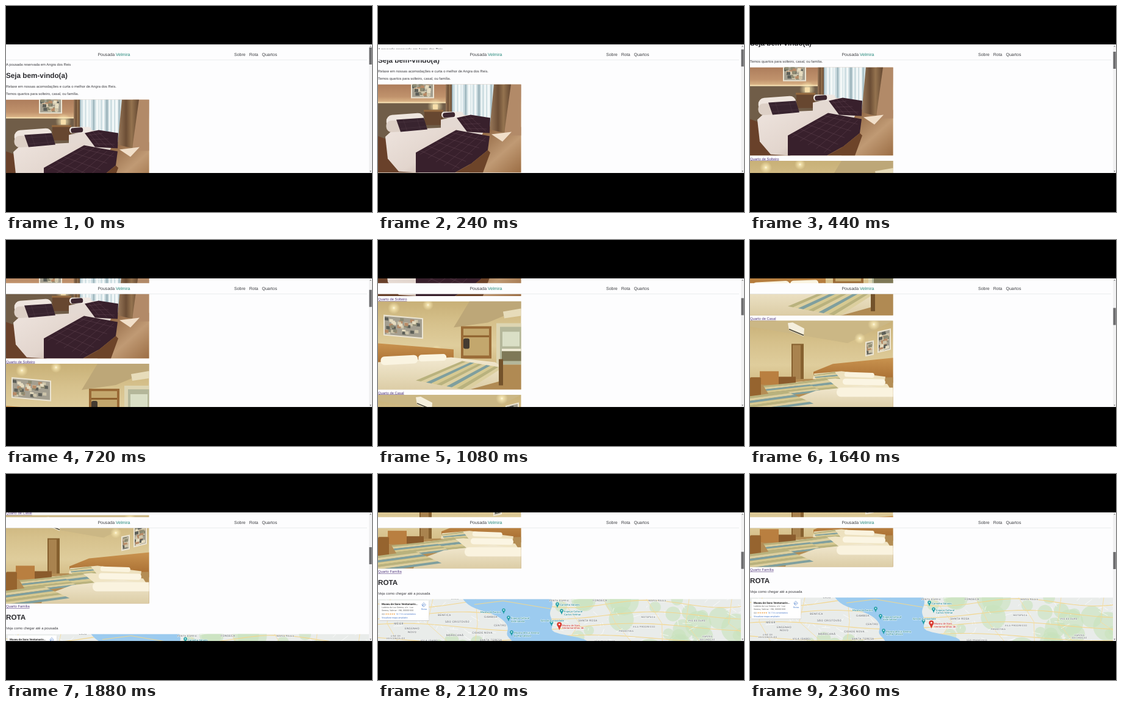
An HTML page that plays this animation: 600 px wide and 338 px high, repeating every 2.52 s.

```html
<!DOCTYPE html>
<html lang="pt-BR">
<head>
<meta charset="utf-8">
<title>Pousada Velmira</title>
<style>
html, body { margin: 0; width: 100%; height: 100%; overflow: hidden; background: #000; }
svg { display: block; }
#stage { width: 100vw; height: 100vh; }
text { font-family: "Liberation Sans", Arial, sans-serif; text-rendering: geometricPrecision; }
.body { font-size: 5.85px; fill: #3c3c40; }
.head { font-size: 11.72px; font-weight: 700; fill: #2b2b2f; }
.link { font-size: 5.85px; fill: #54397f; text-decoration: underline; }
.nav { font-size: 7.03px; fill: #3f4044; }
#map text { font-family: Roboto, Arial, sans-serif; }
.area, .small, .spot { font-weight: 500; paint-order: stroke; stroke: #fff; stroke-width: .8px; }
.area, .small { fill: #74797c; letter-spacing: .35px; text-anchor: middle; }
.area { font-size: 4.7px; }
.small { font-size: 3.9px; }
.spot { font-size: 4.3px; fill: #2f8c96; }
.red { fill: #c8423a; }
.card { font-size: 3.7px; fill: #666; }
</style>
</head>
<body>
<svg id="stage" viewBox="0 0 600 338" preserveAspectRatio="none" xmlns="http://www.w3.org/2000/svg">
<defs>
  <clipPath id="view"><rect y="63" width="600" height="211"/></clipPath>
  <linearGradient id="warm" x2="0" y2="1"><stop stop-color="#ad7d5c"/><stop offset=".14" stop-color="#c0926c"/><stop offset=".24" stop-color="#ecca98"/></linearGradient>
  <linearGradient id="floor" x2="1" y2="1"><stop stop-color="#7d5230"/><stop offset=".6" stop-color="#c09a74"/><stop offset="1" stop-color="#9b6d44"/></linearGradient>
  <linearGradient id="linen" x2="1" y2="1"><stop stop-color="#eee4de"/><stop offset=".6" stop-color="#e2d5cd"/><stop offset="1" stop-color="#b8a294"/></linearGradient>
  <linearGradient id="drape"><stop stop-color="#9a7a5b"/><stop offset=".4" stop-color="#6b4d35"/><stop offset=".65" stop-color="#94734f"/><stop offset="1" stop-color="#634630"/></linearGradient>
  <linearGradient id="cream" x2="0" y2="1"><stop stop-color="#c8b077"/><stop offset=".25" stop-color="#d6c18c"/><stop offset=".5" stop-color="#dfcd9c"/><stop offset="1" stop-color="#c2a264"/></linearGradient>
  <linearGradient id="wood" x2="0" y2="1"><stop stop-color="#c9934f"/><stop offset="1" stop-color="#a4692e"/></linearGradient>
  <linearGradient id="sheet" x2="0" y2="1"><stop stop-color="#f2e9d1"/><stop offset="1" stop-color="#dccda6"/></linearGradient>
  <radialGradient id="glow"><stop stop-color="#fffbe6"/><stop offset=".25" stop-color="#fff1bd" stop-opacity=".7"/><stop offset="1" stop-color="#ffeeb4" stop-opacity="0"/></radialGradient>
</defs>
<rect width="600" height="338"/>
<g clip-path="url(#view)">
  <rect y="63" width="600" height="211" fill="#fdfdfe"/>
  <g id="page">
    <text class="body" y="97.8">A pousada reservada em Angra dos Reis</text>
    <text class="head" y="117.8">Seja bem-vindo(a)</text>
    <text class="body" y="133.6">Relaxe em nossas acomodações e curta o melhor de Angra dos Reis.</text>
    <text class="body" y="146.3">Temos quartos para solteiro, casal, ou família.</text>
    <svg id="single" y="153.5" width="234.5" height="145"></svg>
    <text class="link" y="305.6">Quarto de Solteiro</text>
    <svg id="double" y="307" width="234.5" height="145"></svg>
    <text class="link" y="459">Quarto de Casal</text>
    <svg id="family" y="460.5" width="234.5" height="145"></svg>
    <text class="link" y="612.4">Quarto Família</text>
    <text class="head" y="632.2">ROTA</text>
    <text class="body" y="648.4">Veja como chegar até a pousada</text>
    <svg id="map" y="655.5" width="595" height="90"></svg>
  </g>
  <rect y="70.8" width="595" height="17.4" fill="#fdfdfe"/>
  <rect y="88" width="592" height=".7" fill="#e3e5e9"/>
  <text class="nav" x="150.4" y="81.8">Pousada <tspan fill="#1f8577">Velmira</tspan></text>
  <text class="nav" x="374" y="81.8">Sobre</text>
  <text class="nav" x="398.7" y="81.8">Rota</text>
  <text class="nav" x="419.5" y="81.8">Quartos</text>
  <rect x="595" y="63" width="5" height="211" fill="#f1f1f2"/>
  <path d="M596.3 66.6l1.3-1.6 1.3 1.6zM596.3 270.6l1.3 1.6 1.3-1.6z" fill="#555"/>
  <rect id="thumb" x="595.4" y="68" width="4.3" height="28" fill="#6d6d6f"/>
</g>
</svg>
<script>
const $ = id => document.getElementById(id);
const many = (n, f) => Array.from({ length: n }, (_, i) => f(i)).join('');
const box = (x, y, w, h, fill, r = 0) => `<rect x="${x}" y="${y}" width="${w}" height="${h}" rx="${r}" fill="${fill}"/>`;
const poly = (points, fill) => `<polygon points="${points}" fill="${fill}"/>`;
const line = (points, color, width) => `<polyline points="${points}" fill="none" stroke="${color}" stroke-width="${width}"/>`;
const disc = (x, y, r, fill) => `<circle cx="${x}" cy="${y}" r="${r}" fill="${fill}"/>`;
const glow = (x, y, r) => disc(x, y, r, 'url(#glow)');
const label = (x, y, s, cls) => `<text x="${x}" y="${y}" class="${cls}">${s}</text>`;
const mix = (a, b, k) => [a[0] + (b[0] - a[0]) * k, a[1] + (b[1] - a[1]) * k];
const pillow = (x, y, w, h, tilt, fill) => `<g transform="rotate(${tilt} ${x} ${y})">${box(x, y, w, h, fill, h / 2.2)}</g>`;

function seeded(s) {
  return () => (s = (s * 16807) % 2147483647) / 2147483647;
}

// Bands from edge a-b across to edge c-d.
function stripes(a, b, c, d, n) {
  const cloth = ['#b9b27e', '#dccf9f', '#7f9f9e', '#d6c991'];
  return many(n, i => {
    const k = i / n, m = (i + 1.05) / n;
    return poly([mix(a, c, k), mix(b, d, k), mix(b, d, m), mix(a, c, m)], cloth[i % 4]);
  });
}

function lattice(a, b, c, d, n, color) {
  return many(n, i => {
    const k = (i + .5) / n;
    return line([mix(a, b, k), mix(d, c, k)], color, .4) + line([mix(a, d, k), mix(b, c, k)], color, .4);
  });
}

function painting(x, y, w, h, tilt, seed) {
  const rnd = seeded(seed), tones = ['#5d5f58', '#b78a66', '#e6dcc0', '#8d8a72', '#cfc6ab'];
  return `<g transform="translate(${x} ${y}) skewY(${tilt})">` + box(0, 0, w, h, '#ece5d3') + box(2, 2, w - 4, h - 4, '#a49f90') +
    many(40, i => box(2 + rnd() * (w - 10), 2 + rnd() * (h - 9), 6, 5, tones[i % 5])) + '</g>';
}

function singleRoom() {
  const quilt = '#38202c', seam = '#6b4c5a';
  return box(0, 0, 235, 145, 'url(#warm)') +
    box(150, 70, 85, 75, 'url(#floor)') +
    painting(54, -4, 38, 27, 0, 9) +
    box(0, 30, 120, 75, '#705d48') + box(0, 29, 120, 2, '#f8e2b4') +
    box(120, 0, 70, 68, '#cfdfe3') +
    many(13, i => box(121 + i * 5.3, 0, 2 + i % 3, 66, i % 4 ? '#f3f8f8' : '#a3bac1')) +
    box(111, 0, 10, 48, 'url(#drape)') +
    box(208, 0, 27, 84, '#b28a68') + poly('190,0 218,0 207,80 183,74', 'url(#drape)') +
    poly('186,82 219,78 204,94', '#f1dfc9') +
    glow(94, 36, 13) + box(90, 33, 8, 8, '#f8dfaa') + box(76, 43, 30, 24, '#674730') + box(75, 42, 32, 3, '#94693f') +
    poly('103,58 140,50 184,56 170,84 103,72', '#e4d9d2') +
    pillow(104, 45, 36, 10, 0, '#f0e8e2') + pillow(106, 47, 20, 8, -4, '#3d2730') +
    poly('129,55 152,50 184,55 183,80 146,78', quilt) + lattice([132, 55], [153, 51], [183, 78], [148, 76], 3, seam) +
    poly('0,85 70,110 66,145 0,145', '#69412a') +
    poly('12,86 24,75 128,70 128,130 66,145 34,143 16,122', 'url(#linen)') +
    pillow(13, 51, 62, 22, -4, '#eee5de') + pillow(13, 60, 30, 19, -3, '#ddd0c6') +
    poly('30,58 75,55 81,74 37,78', '#38242f') + lattice([30, 58], [75, 55], [81, 74], [37, 78], 2, '#57404a') +
    poly('62,112 128,75 183,85 180,108 153,130 126,145 62,145', quilt) +
    lattice([62, 112], [128, 76], [182, 88], [128, 143], 5, seam) +
    poly('126,145 153,130 180,108 184,112 172,145', '#6d4429');
}

function doubleRoom() {
  return box(0, 0, 235, 145, 'url(#cream)') +
    poly('150,0 235,0 235,12 180,35 124,43', '#bda778') +
    glow(26, 11, 10) + glow(82, 6, 9) + glow(96, 82, 10) +
    painting(9, 22, 65, 34, 5, 31) +
    poly('0,69 124,79 124,96 0,108', 'url(#wood)') +
    box(136, 41, 50, 53, '#9a6b37') + box(140, 45, 42, 44, '#c3a76d') + box(140, 56, 42, 3, '#8d602d') + box(140, 61, 10, 17, '#443b31', 3) +
    box(194, 36, 41, 82, '#ddd5b2') + box(200, 42, 35, 62, '#b4b79a') + box(204, 50, 28, 24, '#dadfc6') + box(203, 78, 32, 4, '#f3eeda') + box(203, 82, 32, 16, '#7e7857') +
    poly('205,17 234,12 234,24 207,28', '#e7dcba') +
    poly('185,104 235,104 235,145 140,145', '#b08a53') +
    poly('0,100 120,92 192,100 204,108 204,130 150,145 0,145', 'url(#sheet)') +
    pillow(4, 91, 61, 14, -3, '#faf4e1') + pillow(66, 88, 46, 11, -2, '#faf4e1') +
    stripes([62, 130], [138, 98], [146, 146], [204, 109], 10) +
    box(198, 95, 7, 43, '#73522b');
}

function familyRoom() {
  return box(0, 0, 235, 145, 'url(#cream)') +
    poly('0,0 235,0 160,37 96,26 0,10', '#cbb785') +
    glow(203, 6, 10) + glow(180, 29, 9) +
    poly('62,4 70,3 89,13 88,26 64,16', '#f5efdd') + line('64,14 88,24', '#57503f', 1.7) +
    box(68, 38, 20, 62, '#86602f') + box(70, 40, 13, 60, '#a9834f') +
    painting(189, 35, 14, 24, -12, 5) + painting(209, 18, 22, 35, -14, 6) +
    poly('104,84 136,71 235,61 235,102 104,94', 'url(#wood)') +
    poly('0,108 74,96 235,93 235,145 0,145', '#b48d54') +
    box(16, 83, 31, 22, '#b97f40') + box(47, 92, 28, 16, '#8a5b2c') + box(0, 93, 18, 32, '#96642f', 2) +
    poly('105,87 150,83 222,92 220,104 103,96', '#ede1bf') + stripes([104, 89], [139, 84], [110, 99], [150, 98], 6) +
    pillow(155, 84, 49, 8, 2, '#faf3de') +
    poly('74,101 140,95 225,104 235,120 150,122', '#f0e5c5') + stripes([75, 102], [124, 94], [90, 119], [150, 115], 6) +
    pillow(152, 95, 70, 10, 1, '#fbf5e3') +
    stripes([22, 107], [90, 100], [34, 126], [118, 116], 7) +
    poly('58,145 62,132 108,115 190,106 235,114 235,145', 'url(#sheet)') +
    pillow(142, 110, 98, 15, 0, '#faf3df') +
    stripes([0, 124], [60, 116], [0, 150], [104, 136], 7);
}

const step = (y, mid, soft) => 1 / (1 + Math.exp((mid - y) / soft));
const west = y => 138 + 72 * step(y, 20, 5) + 3 * Math.sin(y / 6) + 14 * step(y, 63, 3);
const east = y => 284 + 60 * step(y, 60, 3) + 2 * Math.sin(y / 5);

function pin(x, y, fill, r) {
  return poly([[x - r, y - r], [x + r, y - r], [x, y + r * 1.4]], fill) + disc(x, y - r * 1.2, r * 1.1, fill) + disc(x, y - r * 1.2, r * .4, '#fff');
}

function cityMap() {
  const rnd = seeded(77);
  const ys = Array.from({ length: 31 }, (_, i) => i * 3);
  const coast = [...ys.map(y => [west(y), y]), ...ys.reverse().map(y => [east(y), y])];
  const wave = (y, i) => Array.from({ length: 61 }, (_, n) => [n * 10, y + 6 * Math.sin(n / (4 + i) + i * 2)]);
  const areas = [
    [126, 1, 'CAJU'], [109, 28, 'BENFICA'], [34, 42, 'MÉIER'], [56, 50, 'ENGENHO'], [56, 55.5, 'NOVO'], [130, 39, 'SÃO CRISTÓVÃO'],
    [185, 31, 'GAMBOA'], [200, 45, 'CENTRO'], [126, 61, 'MARACANÃ'], [171, 57, 'CIDADE NOVA'], [85, 69.5, 'VILA ISABEL'],
    [185, 69, 'SANTA TERESA'], [364, 4.3, 'FONSECA'], [344, 36.5, 'SANTA ROSA']
  ];
  const small = [
    [29, 62, 'LINS DE'], [29, 66, 'VASCONCELOS'], [297, 4, "PONTA D'AREIA"], [458, 4, 'MARIA PAULA'], [443, 30.5, 'MATAPACA'],
    [436, 47, 'VILA PROGRESSO'], [407, 53.5, 'PENDOTIBA'], [523, 36.5, 'RIO DO OURO'], [540, 63, 'VÁRZEA'], [540, 67.5, 'DAS MOÇAS'], [372, 71, 'SÃO FRANCISCO']
  ];
  const spots = [
    [206, 21, -38, 'Museu da Aurora'], [214, 33, 4, 'Espaço Cultural', 'da Enseada'], [219, 57, 4, 'Museu de Luz Serena', 'do Rio Celeste'],
    [294, 11, 4, 'Caminho Solares'], [301, 22, 4, 'Espaço Cultural', 'Cartas Velmar'], [284.5, 41, -18, 'Sala da Curiosidade']
  ];
  return box(0, 0, 595, 90, '#e9ecea') +
    many(26, () => `<g opacity=".6">${disc(300 + rnd() * 295, rnd() * 90, 7 + rnd() * 17, '#c9e3bd')}</g>`) +
    many(7, () => disc(rnd() * 190, 62 + rnd() * 20, 5 + rnd() * 9, '#d2e5c9')) +
    many(120, () => {
      const x = rnd() * 595, y = rnd() * 80;
      return line([[x, y], [x + rnd() * 30 - 15, y + rnd() * 18 - 9]], '#fff', .7);
    }) +
    many(4, i => line(wave(8 + i * 19, i), '#f3d68d', 1.1)) +
    many(9, i => line([[i * 70 + 20, 0], [i * 70 + rnd() * 60, 40], [i * 70 + rnd() * 90, 90]], '#f5dda0', .9)) +
    poly(coast, '#9ccbef') + line('158,9 205,3 283,16', '#f0d78e', 1) +
    areas.map(a => label(...a, 'area')).join('') + small.map(a => label(...a, 'small')).join('') +
    spots.map(([x, y, dx, ...rows]) => pin(x, y, '#25a0a8', 2.5) +
      rows.map((s, i) => label(x + dx, y + (dx < -20 ? 1.5 : dx < 0 ? -4.5 : 0) + i * 4.8, s, 'spot')).join('')).join('') +
    pin(297.3, 46, '#d93a30', 3.6) +
    label(302, 44.5, 'Museu de Sons', 'spot red') + label(302, 49.3, 'Ventomarinhos de...', 'spot red') +
    box(2.6, 3, 81, 32.6, '#bbb') + box(2.4, 2.4, 81, 32.6, '#fff') +
    label(6, 10, '<tspan font-weight="700" fill="#222" style="font-size:4.5px">Museu de Sons Ventomarin...</tspan>', 'card') +
    label(6, 15.3, 'Ladeira da Luz Serena, s/n - Luz', 'card') + label(6, 20, 'Serena, Valmar - VM, 00000-000', 'card') +
    label(6, 26, '4,6 <tspan fill="#e88d22">★★★★★</tspan> <tspan fill="#4a78c8">14.114 comentários</tspan>', 'card') +
    label(6, 32, '<tspan fill="#3f72c6">Visualizar mapa ampliado</tspan>', 'card') +
    line('73.5,12 73.5,9.5 76.5,9.5', '#4378c9', .7) + line('75,6 78.3,9.5 75,13 71.7,9.5 75,6', '#4378c9', .6) +
    label(71, 17.5, '<tspan fill="#4378c9">Rotas</tspan>', 'card');
}

$('single').innerHTML = singleRoom();
$('double').innerHTML = doubleRoom();
$('family').innerHTML = familyRoom();
$('map').innerHTML = cityMap();

const LOOP = 2520, STEP = 40;
const keys = [[0, 0], [440, 53], [720, 104], [1080, 206.5], [1400, 265.5], [1880, 393], [2160, 452.6], [2360, 453]];
const rate = i => (keys[i + 1][1] - keys[i][1]) / (keys[i + 1][0] - keys[i][0]);
// Harmonic mean slopes keep the scroll from running backwards.
const slopes = keys.map((_, i) => {
  if (i === 0) return rate(0) * .6;
  if (i === keys.length - 1) return 0;
  const a = rate(i - 1), b = rate(i);
  return 2 * a * b / (a + b);
});

function scrollAt(t) {
  const last = keys.length - 1;
  if (t >= keys[last][0]) return keys[last][1];
  const i = keys.findIndex((k, n) => t < keys[n + 1][0]);
  const [t0, y0] = keys[i], [t1, y1] = keys[i + 1];
  const h = t1 - t0, u = (t - t0) / h, v = 1 - u;
  return y0 * (1 + 2 * u) * v * v + slopes[i] * h * u * v * v + y1 * u * u * (3 - 2 * u) - slopes[i + 1] * h * u * u * v;
}

function draw(ms) {
  const y = scrollAt(Math.floor((ms % LOOP) / STEP) * STEP);
  $('page').setAttribute('transform', `translate(0 ${-y.toFixed(2)})`);
  $('thumb').setAttribute('y', (68 + y * .1325).toFixed(2));
}

const start = performance.now();
function tick() {
  draw(performance.now() - start);
  requestAnimationFrame(tick);
}
tick();
</script>
</body>
</html>
```
